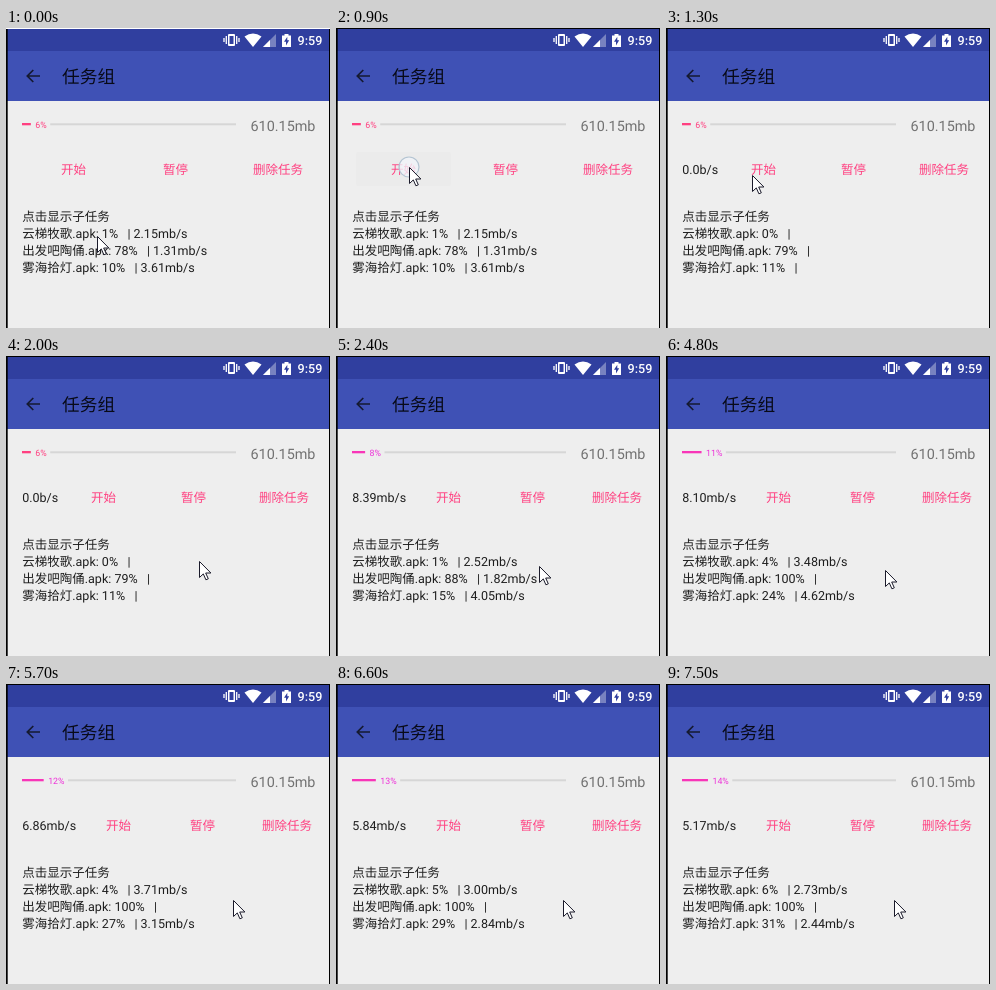
An HTML page that plays this animation: 324 by 300 pixels, repeating every 8 s.

```html
<!DOCTYPE html>
<html lang="zh-CN">
<head>
<meta charset="utf-8">
<title>任务组</title>
<style>
  html, body { margin: 0; width: 100%; height: 100%; overflow: hidden; background: #eee; }
  svg { display: block; width: 324px; height: 300px; }
  text {
    font: 12.53px Roboto, "Noto Sans CJK SC", "Noto Sans CJK", sans-serif;
    fill: #1e1e1e;
    white-space: pre;
    text-rendering: geometricPrecision;
  }
  .title { font-size: 17.7px; font-weight: 500; fill: #080a17; }
  .clock { font-size: 12.6px; font-weight: 500; fill: #fff; }
  .size { font-size: 14.4px; fill: #727272; }
  .button { fill: #ff4081; }
  #percent { font-size: 8.8px; }
</style>
</head>
<body>
<svg viewBox="0 0 324 300">
  <rect width="324" height="300" fill="#eee"/>
  <rect width="324" height="73" fill="#3f51b5"/>
  <rect width="324" height="23" fill="#303f9f"/>

  <g fill="#fff">
    <rect x="222" y="6" width="7" height="12" rx="1"/>
    <rect x="223.5" y="8" width="4" height="8" fill="#303f9f"/>
    <path d="M220.3 8v8M218 10v4M230.7 8v8M233 10v4" stroke="#fff" stroke-width="1.3"/>
    <path d="M238.5 8.5Q247 2.5 255.5 8.5L247 19z"/>
    <path d="M270 6v13h-13z" opacity=".35"/>
    <path d="M264 12v7h-7z"/>
    <path d="M276 7.5h2.5V6h4v1.5H285V19h-9z"/>
    <path d="M281.3 8.8l-3.3 5h2v3.7l3.2-5.2h-1.9z" fill="#303f9f"/>
  </g>
  <text class="clock" x="291.5" y="17">9:59</text>

  <path d="M34 48H21.5M27.3 42l-6 6 6 6" fill="none" stroke="#151a30" stroke-width="1.7"/>
  <text class="title" x="56" y="54.5">任务组</text>

  <rect id="rest" y="95.3" height="2" fill="#d6d6d6"/>
  <rect id="done" x="16" y="95" height="2.3"/>
  <text id="percent" y="99.5"></text>
  <text class="size" x="244.5" y="102.5">610.15mb</text>

  <rect id="press" x="20" y="124" width="95" height="34" rx="2" fill="#ebebeb"/>
  <text id="speed" x="16.2" y="145.7"></text>
  <text class="button" y="145.7">开始</text>
  <text class="button" y="145.7">暂停</text>
  <text class="button" y="145.7">删除任务</text>

  <text x="16.2" y="192.7">点击显示子任务</text>
  <text class="task" x="16.2" y="209.5"></text>
  <text class="task" x="16.2" y="226.5"></text>
  <text class="task" x="16.2" y="243.5"></text>

  <circle id="click" cx="73" cy="139" r="10" fill="#f1f3f8" fill-opacity=".78" stroke="#b4c4d2" stroke-width="1.2"/>
  <path id="pointer" d="M.5 .5V16.5l3.8-3.6 2.6 5.9 2.4-1-2.6-5.8h5.2z" fill="#fff" stroke="#1a1a2a"/>
  <path d="M0 0h1.7v300H0zM323 0h1v300h-1z" fill="#000"/>
  <rect id="edge" width="324" height="1"/>
</svg>
<script>
  const LOOP = 8000, STEP = 100, BAR_X = 16, BAR_END = 230, GAP = 4;
  const names = ['云梯牧歌', '出发吧陶俑', '雾海拾灯'];

  // start time, total progress, total speed, then progress and speed per task
  const states = [
    [0, 6, '', ['1', '2.15'], ['78', '1.31'], ['10', '3.61']],
    [1200, 6, '0.0b/s', ['0'], ['79'], ['11']],
    [2100, 8, '8.39mb/s', ['1', '2.52'], ['88', '1.82'], ['15', '4.05']],
    [3000, 9, '8.73mb/s', ['2', '2.80'], ['98', '1.71'], ['19', '4.21']],
    [3900, 9, '7.62mb/s', ['3', '3.20'], ['100'], ['22', '4.42']],
    [4800, 11, '8.10mb/s', ['4', '3.48'], ['100'], ['24', '4.62']],
    [5700, 12, '6.86mb/s', ['4', '3.71'], ['100'], ['27', '3.15']],
    [6600, 13, '5.84mb/s', ['5', '3.00'], ['100'], ['29', '2.84']],
    [7500, 14, '5.17mb/s', ['6', '2.73'], ['100'], ['31', '2.44']]
  ];

  // time, x, y
  const path = [
    [0, 91, 208], [100, 90, 209], [300, 76, 146], [400, 73, 133],
    [500, 73, 133], [600, 73, 139], [1200, 73, 139], [1500, 112, 162],
    [1800, 180, 198], [2000, 193, 205], [2300, 198, 208], [2700, 219, 214],
    [4800, 219, 214], [5000, 227, 216], [7200, 227, 216], [7300, 228, 216], [LOOP, 228, 216]
  ];

  const $ = id => document.getElementById(id);
  const buttons = document.querySelectorAll('.button');
  const tasks = document.querySelectorAll('.task');
  const set = (el, attrs) => Object.entries(attrs).forEach(([k, v]) => el.setAttribute(k, v));
  const show = (id, visible) => set($(id), { opacity: visible ? 1 : 0 });

  function pointerAt(t) {
    const i = path.findIndex(p => p[0] > t);
    const [t0, x0, y0] = path[i - 1], [t1, x1, y1] = path[i];
    const k = (t - t0) / (t1 - t0);
    return [Math.round(x0 + (x1 - x0) * k), Math.round(y0 + (y1 - y0) * k)];
  }

  function buttonColumns(speed) {
    if (!speed) return [55, 157, 247];
    return speed.length < 7 ? [85, 175, 253] : [100, 184, 256];
  }

  function drawProgress(value, running) {
    const x = BAR_X + (BAR_END - BAR_X) * value / 100;
    const label = $('percent');
    label.textContent = value + '%';
    label.style.fill = running ? '#ee30d8' : '#ff4081';
    set(label, { x: x + .5 });
    set($('done'), { width: x - GAP - BAR_X, fill: running ? '#f835b8' : '#ff4081' });
    const start = x + label.getComputedTextLength() + GAP;
    set($('rest'), { x: start, width: BAR_END - start });
  }

  function render(t) {
    const [since, progress, speed, ...rows] = states.filter(s => s[0] <= t).pop();
    drawProgress(progress, since >= 2100);
    $('speed').textContent = speed;
    buttonColumns(speed).forEach((x, i) => set(buttons[i], { x }));
    rows.forEach(([done, rate], i) => {
      tasks[i].textContent = `${names[i]}.apk: ${done}%   |${rate ? ` ${rate}mb/s` : ''}`;
    });
    show('press', t >= 700 && t < 1200);
    show('click', t >= 700 && t < 1100);
    set($('edge'), { fill: t < 600 ? '#fff' : '#000' });
    set($('pointer'), { transform: `translate(${pointerAt(t)})` });
  }

  const origin = performance.now();
  function tick() {
    const t = (performance.now() - origin) % LOOP;
    render(Math.floor(t / STEP) * STEP);
    requestAnimationFrame(tick);
  }
  tick();
</script>
</body>
</html>
```
